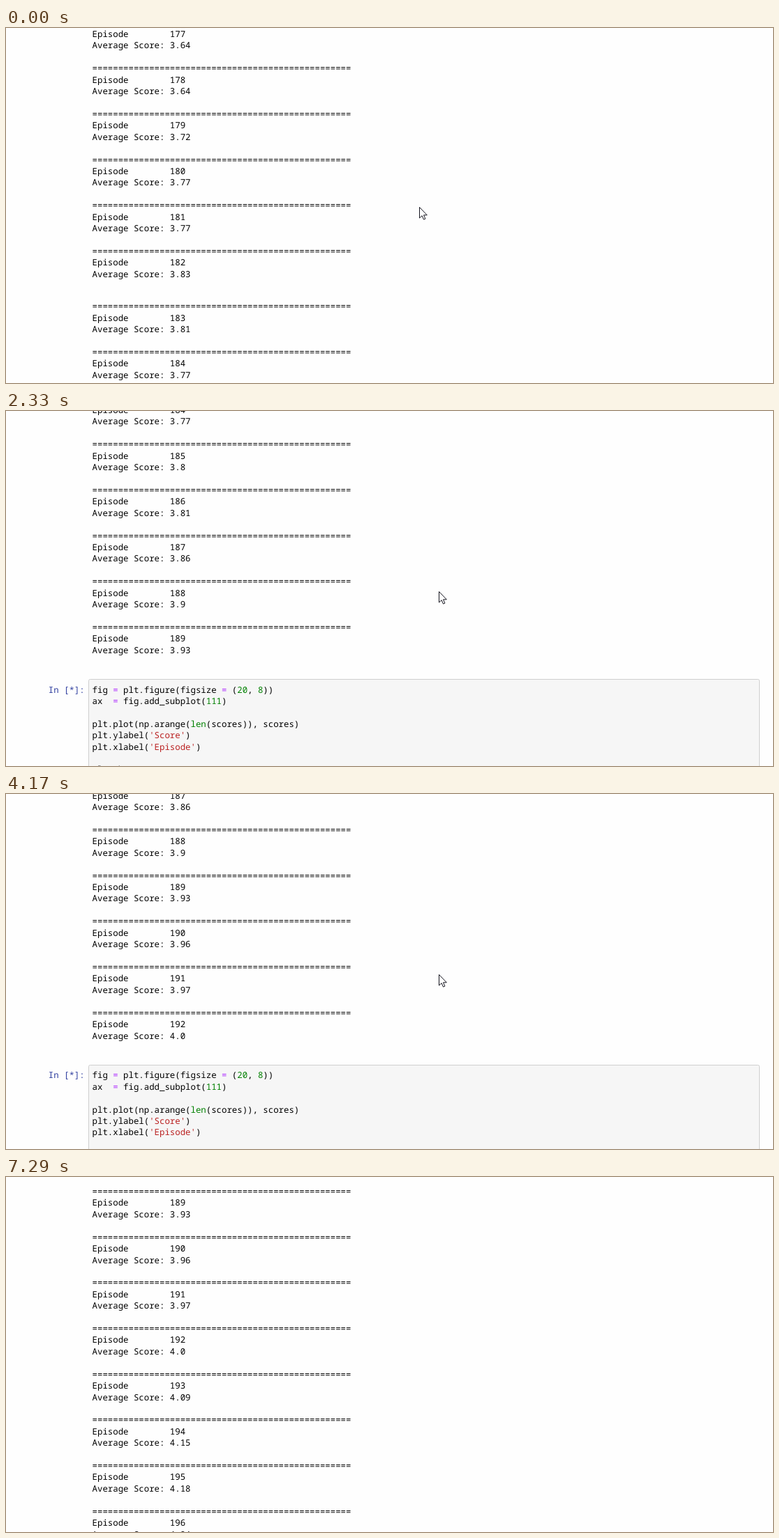
An HTML page with a canvas for the animation above (7570 ms loop, 1099x510 px).

```html
<!DOCTYPE html>
<html lang="en">
<head>
<meta charset="utf-8">
<title>Training log</title>
<style>
  html, body { margin: 0; width: 100%; height: 100%; overflow: hidden; background: #fefefe; }
  canvas { display: block; width: 1099px; height: 510px; }
</style>
</head>
<body>
<canvas id="stage"></canvas>
<script>
const W = 1099, H = 510, LOOP = 7570;
const LINE = 16.42, BLOCK = 4 * LINE, NOTCH = 96.65;
const TEXT_X = 123.6, BASELINE = 4;
const FONT = '12.37px "Noto Sans Mono", "DejaVu Sans Mono", monospace';

// The printed log, from the first episode on
const FIRST = 177;
const SCORES = ('3.64 3.64 3.72 3.77 3.77 3.83 3.81 3.77 3.8 3.81 ' +
  '3.86 3.9 3.93 3.96 3.97 4.0 4.09 4.15 4.18 4.24').split(' ');
const EPISODE_MS = 644;

// Bursts of the mouse wheel, each shown in a few steps
const BURSTS = [
  { start: 430, step: 120, count: 3, notches: 3 },
  { start: 2030, step: 150, count: 3, notches: 2 },
  { start: 3810, step: 120, count: 4, notches: 2 },
  { start: 5960, step: 120, count: 2, notches: 1 }
];

const CODE = `fig = plt.figure(figsize = (20, 8))
ax  = fig.add_subplot(111)

plt.plot(np.arange(len(scores)), scores)
plt.ylabel('Score')
plt.xlabel('Episode')

plt.show()`.split('\n');
const CELL_H = CODE.length * LINE + 12.7;
const ARROW = new Path2D('M0 0V15.5L3.6 12.2L6 17.6L8.4 16.6L6 11.3H10.8Z');

const canvas = document.getElementById('stage');
const ctx = canvas.getContext('2d');
const ratio = window.devicePixelRatio || 1;
canvas.width = W * ratio;
canvas.height = H * ratio;
ctx.scale(ratio, ratio);
ctx.font = FONT;
ctx.textRendering = 'geometricPrecision';
ctx.lineWidth = 1;
const charW = ctx.measureText('=').width;

const clamp = (v, lo, hi) => Math.min(hi, Math.max(lo, v));
const ease = p => 1 - (1 - p * p) ** 5;

function scrollAt(t) {
  let notches = 0;
  for (const b of BURSTS) {
    if (t < b.start) continue;
    const k = Math.floor((t - b.start) / b.step);
    notches += b.notches * ease(Math.min(1, (k + 0.1) / (b.count - 0.9)));
  }
  return notches * NOTCH;
}

// Episode 186 is the last one at the start; more follow at a steady pace.
function lastEpisode(t) {
  const added = Math.floor((t - 301) / EPISODE_MS);
  return clamp(186 + added, 186, FIRST + SCORES.length - 1);
}

// Tip of the pointer: a nudge, a rest, then a stepped sweep off the stage
function pointerAt(t) {
  if (t < 150) return [592, 257];
  if (t < 6480) return [620, 259];
  if (t >= 7290) return null;
  const p = Math.min(1, Math.floor((t - 6480) / 150) * 150 / 660);
  return [625 + 381 * p ** 1.2, 268 + 227 * p];
}

// Page position of a separator; a new output area begins at 183.
const separatorY = n => 58.2 + (n - 178) * BLOCK + (n > 182 ? 13.5 : 0);

function text(str, x, center, color = '#000') {
  ctx.fillStyle = color;
  ctx.fillText(str, x, center + BASELINE);
}

function tokenColor(token) {
  if (token[0] === "'") return '#ba2121';
  if (token === '=') return '#aa22ff';
  if (token === 'len' || /^\d/.test(token)) return '#008000';
  return '#000';
}

function drawCode(line, center) {
  for (const m of line.matchAll(/'[^']*'|\w+|=|[^\w\s=']+/g)) {
    text(m[0], TEXT_X + m.index * charW, center, tokenColor(m[0]));
  }
}

function drawEpisode(n, y) {
  text('='.repeat(50), TEXT_X, y);
  text('Episode        ' + n, TEXT_X, y + LINE);
  text('Average Score: ' + SCORES[n - FIRST], TEXT_X, y + 2 * LINE);
}

function drawCell(top) {
  if (top > H) return;
  ctx.beginPath();
  ctx.roundRect(118.5, Math.round(top) + 0.5, 961, CELL_H, 2);
  ctx.fillStyle = '#f6f6f6';
  ctx.fill();
  ctx.strokeStyle = '#cfcfcf';
  ctx.stroke();
  const first = top + 15.1;
  text('In [*]:', 60.8, first, '#303f9f');
  CODE.forEach((line, i) => drawCode(line, first + i * LINE));
}

function drawPointer([x, y]) {
  ctx.save();
  ctx.translate(Math.round(x) + 0.5, Math.round(y) + 0.5);
  ctx.fillStyle = '#fff';
  ctx.fill(ARROW);
  ctx.strokeStyle = '#15151f';
  ctx.stroke(ARROW);
  ctx.restore();
}

function draw(t) {
  ctx.fillStyle = '#fefefe';
  ctx.fillRect(0, 0, W, H);
  const scroll = scrollAt(t);
  const last = lastEpisode(t);
  for (let n = FIRST; n <= last; n++) drawEpisode(n, separatorY(n) - scroll);
  drawCell(separatorY(last) + 74.5 - scroll);
  const tip = pointerAt(t);
  if (tip) drawPointer(tip);
}

const start = performance.now();
function tick() {
  draw((performance.now() - start) % LOOP);
  requestAnimationFrame(tick);
}
tick();
</script>
</body>
</html>
```
